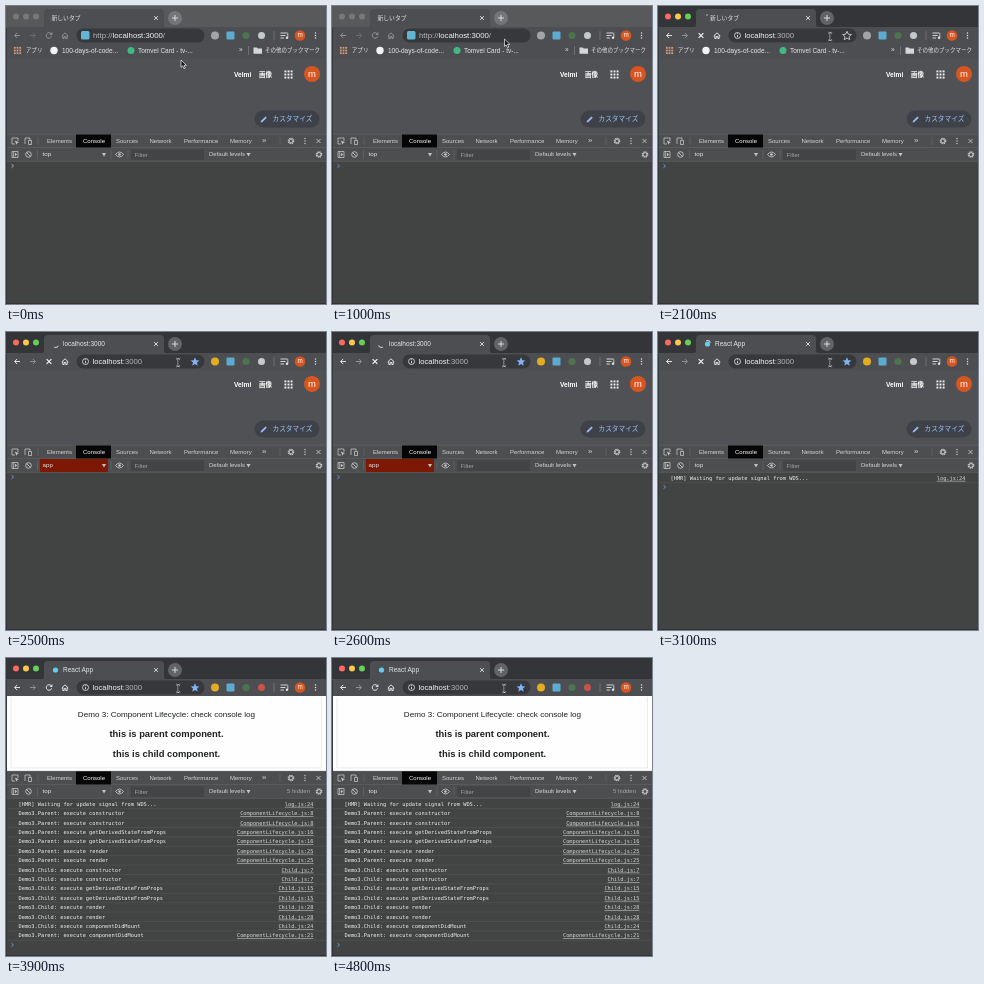
These frames come from a looping animation (320 by 298 pixels, 5200 ms). An HTML page:

```html
<!DOCTYPE html>
<html lang="ja">
<head>
<meta charset="utf-8">
<style>
html, body { margin: 0; width: 100%; height: 100%; overflow: hidden; background: #424343; }
svg { display: block; width: 100vw; height: 100vh; }
text { font-family: "Liberation Sans", "Noto Sans CJK JP", "Noto Sans CJK", sans-serif; white-space: pre; }
.mono { font-family: "DejaVu Sans Mono", monospace; }
</style>
</head>
<body>
<svg id="stage" viewBox="0 0 320 298"></svg>
<script>
const LOOP = 5200, STEP = 100;
const ACTIVE = 1300, LOAD = 2000, COMMIT = 2400, TITLE = 2900, LOG = 3000, RENDER = 3200, DONE = 3400;
const stage = document.getElementById('stage');
const timed = [];

function add(parent, tag, attrs, content) {
  const el = document.createElementNS('http://www.w3.org/2000/svg', tag);
  for (const key in attrs) el.setAttribute(key, attrs[key]);
  if (content !== undefined) el.textContent = content;
  parent.append(el);
  return el;
}
const group = parent => add(parent, 'g', {});
function span(parent, from, to = LOOP) {
  const el = group(parent);
  timed.push({ el, from, to });
  return el;
}
const rect = (p, x, y, width, height, fill, rx = 0) => add(p, 'rect', { x, y, width, height, fill, rx });
const dot = (p, cx, cy, r, fill) => add(p, 'circle', { cx, cy, r, fill });
const line = (p, d, stroke = '#dfe1e4', width = 1) =>
  add(p, 'path', { d, stroke, 'stroke-width': width, fill: 'none' });
const shape = (p, d, fill) => add(p, 'path', { d, fill });
// y is the vertical centre of the text
const text = (p, x, y, size, str, fill = '#e4e5e7', extra = {}) =>
  add(p, 'text', { x, y: y + size * 0.35, 'font-size': size, fill, ...extra }, str);
const cross = (p, x, y, r, color, w) =>
  line(p, `M${x - r} ${y - r}l${2 * r} ${2 * r}m0 ${-2 * r}l${-2 * r} ${2 * r}`, color, w);
function grid(p, x, y, pitch, size, fill) {
  for (let i = 0; i < 9; i++)
    rect(p, x + (i % 3 - 1) * pitch - size / 2, y + (Math.floor(i / 3) - 1) * pitch - size / 2, size, size, fill);
}
function dots(p, x, y, fill) {
  for (let i = -1; i <= 1; i++) dot(p, x, y + i * 2.6, 0.75, fill);
}
function gear(p, x, y) {
  add(p, 'circle', { cx: x, cy: y, r: 2.6, fill: 'none', stroke: '#c2c4c6', 'stroke-width': 1.5, 'stroke-dasharray': '1.3 .74' });
  add(p, 'circle', { cx: x, cy: y, r: 1.9, fill: 'none', stroke: '#c2c4c6', 'stroke-width': 0.9 });
}
const caret = (p, x, y) => shape(p, `M${x - 2} ${y - 1.5}h4l-2 3.4z`, '#c2c4c6');

// Tab strip
function drawTabs() {
  const idle = span(stage, 0, ACTIVE), live = span(stage, ACTIVE);
  rect(idle, 0, 0, 320, 24, '#58595b');
  rect(live, 0, 0, 320, 24, '#343539');
  const lights = ['#fb6a5f', '#fbc84c', '#66cf58'];
  [10, 20, 30].forEach((x, i) => {
    dot(idle, x, 10.5, 3, '#77787a');
    dot(live, x, 10.5, 3, lights[i]);
  });
  shape(stage, 'M34 22q4 0 4-4V7q0-4 4-4H154q4 0 4 4V18q0 4 4 4z', '#4d4e52');
  text(span(stage, 0, LOAD), 45.5, 12, 5.8, '新しいタブ');
  const opening = span(stage, LOAD, COMMIT);
  text(opening, 52, 12, 5.8, '新しいタブ');
  dot(opening, 49, 9, 0.8, '#c8cacc');
  text(span(stage, COMMIT, TITLE), 57, 12, 6.5, 'localhost:3000');
  const app = span(stage, TITLE);
  text(app, 57, 12, 6.5, 'React App');
  dot(app, 49.5, 12, 2.6, '#62cdec');
  cross(stage, 150, 12, 1.9, '#dfe1e4', 0.9);
  dot(idle, 169, 12, 7, '#747578');
  dot(live, 169, 12, 7, '#626366');
  line(stage, 'M166 12h6m-3-3v6', '#e4e5e7', 0.9);
}

function drawNav(bar) {
  const nav = group(bar);
  line(nav, 'M14 29.5H8.6m2.6-2.6-2.6 2.6 2.6 2.6');
  line(nav, 'M24 29.5H29.4m-2.6-2.6 2.6 2.6-2.6 2.6', '#8f9093');
  for (const [from, to] of [[0, LOAD], [DONE, LOOP]]) {
    const reload = span(nav, from, to);
    line(reload, 'M45.1 27.6A2.8 2.8 0 1 0 45.7 30.3');
    shape(reload, 'M46.4 26v2.9h-2.9z', '#dfe1e4');
  }
  cross(span(nav, LOAD, DONE), 43, 29.5, 2.4, '#f0f1f2', 1.2);
  line(nav, 'M55.7 30l3.3-3.2 3.3 3.2M56.8 29.3v3.2h1.4v-2h1.6v2h1.4v-3.2');
  return nav;
}

// Address bar and extension icons
function drawToolbar() {
  const bar = group(stage);
  rect(bar, 0, 21, 320, 17, '#4d4e52');
  const nav = drawNav(bar);
  rect(bar, 70.5, 22.5, 128, 14, '#37383b', 7);

  const typed = span(bar, 0, LOAD);
  rect(typed, 75, 25, 8.5, 8.5, '#62b5d3', 1.5);
  const url = text(typed, 87, 29.5, 7.8, '', '#b3b5b8');
  add(url, 'tspan', {}, 'http://');
  add(url, 'tspan', { fill: '#f3f4f5' }, 'localhost:3000');
  add(url, 'tspan', {}, '/');

  const opened = span(bar, LOAD);
  add(opened, 'circle', { cx: 79.5, cy: 29.5, r: 3, fill: 'none', stroke: '#d4d6d8', 'stroke-width': 0.9 });
  line(opened, 'M79.5 29v2.3M79.5 27.3v.9', '#d4d6d8', 0.9);
  const host = text(opened, 86.5, 29.5, 7.7, '', '#b3b5b8');
  add(host, 'tspan', { fill: '#f3f4f5' }, 'localhost');
  add(host, 'tspan', {}, ':3000');
  const star = 'M189 25.3l1.3 2.9 3.1.3-2.4 2.1.7 3.1-2.7-1.7-2.7 1.7.7-3.1-2.4-2.1 3.1-.3z';
  line(span(bar, LOAD, COMMIT), star, '#dfe1e4', 0.8);
  shape(span(bar, COMMIT), star, '#82b1f5');

  dot(span(bar, 0, COMMIT), 209, 29.5, 4, '#a3a4a7');
  dot(span(bar, COMMIT), 209, 29.5, 4, '#e3ad22');
  rect(bar, 220.5, 25.5, 8, 8, '#5cabd0', 1);
  dot(bar, 240, 29.5, 3.6, '#4d7350');
  dot(span(bar, 0, DONE), 255.5, 29.5, 3.5, '#c5c9cc');
  dot(span(bar, DONE), 255.5, 29.5, 3.5, '#c9524a');
  line(bar, 'M268 25v9', '#77787b', 0.8);
  line(bar, 'M274.5 27h7m-7 2.5h5m-5 2.5h3.5', '#dfe1e4', 0.9);
  dot(bar, 281, 31.8, 1.2, '#dfe1e4');
  line(bar, 'M281.8 31.8v-4.6', '#dfe1e4', 0.8);
  dot(bar, 294, 29.5, 5.3, '#d65622');
  text(bar, 294, 29, 6.3, 'm', '#fff', { 'text-anchor': 'middle' });
  dots(bar, 309.5, 29.5, '#dfe1e4');
  return nav;
}

function drawBookmarks() {
  const bar = span(stage, 0, COMMIT);
  rect(bar, 0, 37.5, 320, 15.5, '#4d4e52');
  grid(bar, 11.5, 44.5, 2.7, 1.8, '#d69a78');
  text(bar, 19.7, 44.5, 5.6, 'アプリ');
  dot(bar, 48, 44.5, 3.7, '#f1f2f3');
  text(bar, 56, 44.5, 6.5, '100-days-of-code...');
  dot(bar, 125, 44.5, 3.5, '#42b883');
  text(bar, 132, 44.5, 6.5, 'Tomvel Card - tv-...');
  text(bar, 233, 44, 6.5, '»');
  line(bar, 'M242.5 40v9', '#77787b', 0.8);
  shape(bar, 'M247.5 41.5h3.2l1 1h4.3v5.2h-8.5z', '#d4d6d8');
  text(bar, 259, 44.5, 5.5, 'その他のブックマーク');
}

function drawPage() {
  const page = group(stage);
  rect(page, 0, 38, 320, 92, '#505155');
  const start = span(page, 0, RENDER), lift = group(start);
  text(lift, 228, 68.5, 6.6, 'Velmi', '#fff', { 'font-weight': 'bold' });
  text(lift, 253, 68.5, 6.4, '画像', '#fff', { 'font-weight': 'bold' });
  grid(lift, 282.5, 68.5, 3.1, 1.9, '#eeeff0');
  dot(lift, 306, 68, 8, '#d65622');
  text(lift, 306, 67.5, 9.5, 'm', '#fff', { 'text-anchor': 'middle' });
  rect(lift, 248.5, 104.5, 65, 17, '#3f4148', 8.5);
  line(lift, 'M255.8 115.4l4.3-4.3', '#9cc0f6', 1.8);
  shape(lift, 'M254.6 116.5l.5-2.2 1.7 1.7z', '#9cc0f6');
  text(lift, 266.5, 113, 6.7, 'カスタマイズ', '#9cc0f6');

  const app = span(page, RENDER);
  rect(app, 1, 38, 319, 76, '#fefefe');
  line(app, 'M5 39V110H315.5V39', '#e4e4e4', 0.7);
  const centred = (y, size, str, extra) =>
    text(app, 160.5, y, size, str, '#1d1f21', { 'text-anchor': 'middle', ...extra });
  centred(56.5, 8.1, 'Demo 3: Component Lifecycle: check console log');
  centred(75.5, 9.4, 'this is parent component.', { 'font-weight': 'bold' });
  centred(95.5, 9.4, 'this is child component.', { 'font-weight': 'bold' });
  return lift;
}

function drawLog(panel) {
  const steps = [
    ['Parent', 'constructor', 8, 2], ['Parent', 'getDerivedStateFromProps', 16, 2], ['Parent', 'render', 25, 2],
    ['Child', 'constructor', 7, 2], ['Child', 'getDerivedStateFromProps', 15, 2], ['Child', 'render', 28, 2],
    ['Child', 'componentDidMount', 24, 1], ['Parent', 'componentDidMount', 21, 1]
  ];
  const files = { Parent: 'ComponentLifecycle.js', Child: 'Child.js' };
  let y = 161;
  function row(p, msg, link) {
    text(p, 12.5, y, 5.34, msg, '#eeefef', { class: 'mono' });
    text(p, 307.5, y, 5.3, link, '#d4d5d5', { class: 'mono', 'text-anchor': 'end', 'text-decoration': 'underline' });
    line(p, `M1 ${y + 4.7}H320`, '#545555', 0.6);
    y += 9.4;
  }
  row(span(panel, LOG), '[HMR] Waiting for update signal from WDS...', 'log.js:24');
  const logs = span(panel, RENDER);
  for (const [who, what, at, count] of steps)
    for (let i = 0; i < count; i++) row(logs, `Demo3.${who}: execute ${what}`, `${files[who]}:${at}`);
}

function drawDevtools() {
  const panel = group(stage);
  rect(panel, 0, 128, 320, 190, '#424343');
  rect(panel, 0, 128, 320, 27.5, '#4d4e4f');
  line(panel, 'M0 128.3H320M0 141.5H320M0 155.3H320', '#626364', 0.6);
  line(panel, 'M9 138H6v-6h6v3', '#c2c4c6', 0.8);
  shape(panel, 'M8.8 134.6l4.2 1.7-1.7.7-.7 1.8z', '#c2c4c6');
  line(panel, 'M19 138v-6h5v2M22.5 134.5h3v4h-3z', '#c2c4c6', 0.8);
  rect(panel, 70, 128.5, 35, 13, '#060606');
  const tabs = { Elements: 41, Console: 77, Sources: 110, Network: 143.5, Performance: 178, Memory: 224 };
  for (const name in tabs)
    text(panel, tabs[name], 135, 6, name, name === 'Console' ? '#fff' : '#d4d5d6');
  text(panel, 256, 134.5, 8, '»', '#d4d5d6');
  gear(panel, 285, 135);
  dots(panel, 299, 135, '#c2c4c6');
  cross(panel, 312.5, 135, 2, '#c2c4c6', 0.9);
  line(panel, 'M32 131v8M274 131v8M31.5 144v9M105 144v9M122 144v9', '#67686a', 0.7);

  line(panel, 'M6 145.5h6v6H6zM7.7 145.5v6', '#c2c4c6', 0.8);
  shape(panel, 'M9 146.8l2.2 1.7-2.2 1.7z', '#c2c4c6');
  add(panel, 'circle', { cx: 22.5, cy: 148.5, r: 2.8, fill: 'none', stroke: '#c2c4c6', 'stroke-width': 0.9 });
  line(panel, 'M20.5 146.5l4 4', '#c2c4c6', 0.9);
  const flash = rect(panel, 34, 142, 68, 13, '#7d1804');
  const context = (from, to, name) => text(span(panel, from, to), 36.5, 148.3, 6.2, name);
  context(0, 2500, 'top');
  context(2500, TITLE, 'app');
  context(TITLE, LOOP, 'top');
  caret(panel, 98, 148.5);
  line(panel, 'M109.5 148.5q4-5 8 0q-4 5-8 0z', '#c2c4c6', 0.9);
  dot(panel, 113.5, 148.5, 1.3, '#c2c4c6');
  rect(panel, 125, 143.5, 73, 10.5, '#434445');
  text(panel, 128.5, 148.5, 6, 'Filter', '#a0a2a3');
  text(panel, 203, 148.3, 6, 'Default levels', '#d4d5d6');
  caret(panel, 242.5, 148.5);
  text(span(panel, RENDER), 281, 148.3, 6, '5 hidden', '#a5a7a8');
  gear(panel, 313, 148.5);

  drawLog(panel);
  const prompt = line(panel, 'M5.5 -1.8l2 1.8-2 1.8', '#6b9ff0', 0.9);
  return { panel, flash, prompt };
}

const startPage = drawPage();
drawTabs();
const nav = drawToolbar();
drawBookmarks();
const { panel, flash, prompt } = drawDevtools();
rect(stage, 0, 22, 0.8, 276, '#343539');
rect(stage, 0, 297.3, 320, 0.7, '#302833');

const spinner = line(span(stage, COMMIT, DONE), 'M0 -3.3A3.3 3.3 0 0 1 3.3 0', '#d0d3d6', 1);
const arrow = add(span(stage, 0, 1200), 'path', {
  d: 'M0 0v7.4l1.7-1.6 1.3 2.9 1.3-.6-1.3-2.8h2.4z', fill: '#161616', stroke: '#f4f4f4', 'stroke-width': 0.7
});
const beam = span(stage, 1200);
for (const [color, width] of [['#f2f2f2', 1.6], ['#1c1c1c', 0.7]])
  line(beam, 'M170.3 26.5q1.9 0 1.9 1.2v5.6q0 1.2-1.9 1.2M174.1 26.5q-1.9 0-1.9 1.2v5.6q0 1.2 1.9 1.2', color, width);

const path = [[0, 175, 54], [300, 176, 55], [500, 176, 55], [1000, 172.5, 33], [1100, 172, 31]];
function pointer(t) {
  const i = path.findIndex(p => p[0] > t);
  if (i < 0) return path[path.length - 1].slice(1);
  const [t0, x0, y0] = path[i - 1], [t1, x1, y1] = path[i];
  const k = (t - t0) / (t1 - t0), e = k * k * (3 - 2 * k);
  return [x0 + (x1 - x0) * e, y0 + (y1 - y0) * e];
}
const move = (el, x, y, turn = 0) => el.setAttribute('transform', `translate(${x} ${y}) rotate(${turn})`);

function draw(now) {
  const t = Math.floor(now % LOOP / STEP) * STEP;
  for (const { el, from, to } of timed) el.style.display = t >= from && t < to ? '' : 'none';
  const committed = t >= COMMIT;
  move(startPage, 0, committed ? -16 : 0);
  move(panel, 0, committed ? -15 : 0);
  move(prompt, 0, t >= RENDER ? 302 : t >= LOG ? 170 : 160);
  prompt.setAttribute('stroke', t < 200 ? '#b5b7b9' : '#6b9ff0');
  nav.style.opacity = t < ACTIVE ? 0.45 : 1;
  flash.style.opacity = t < 2500 ? 0 : Math.max(0, Math.min(1, (3000 - t) / 300));
  move(arrow, ...pointer(t));
  move(spinner, 49.5, 12, t * 0.36 - 60);
}
const begin = performance.now();
function tick() {
  draw(performance.now() - begin);
  requestAnimationFrame(tick);
}
tick();
</script>
</body>
</html>
```
